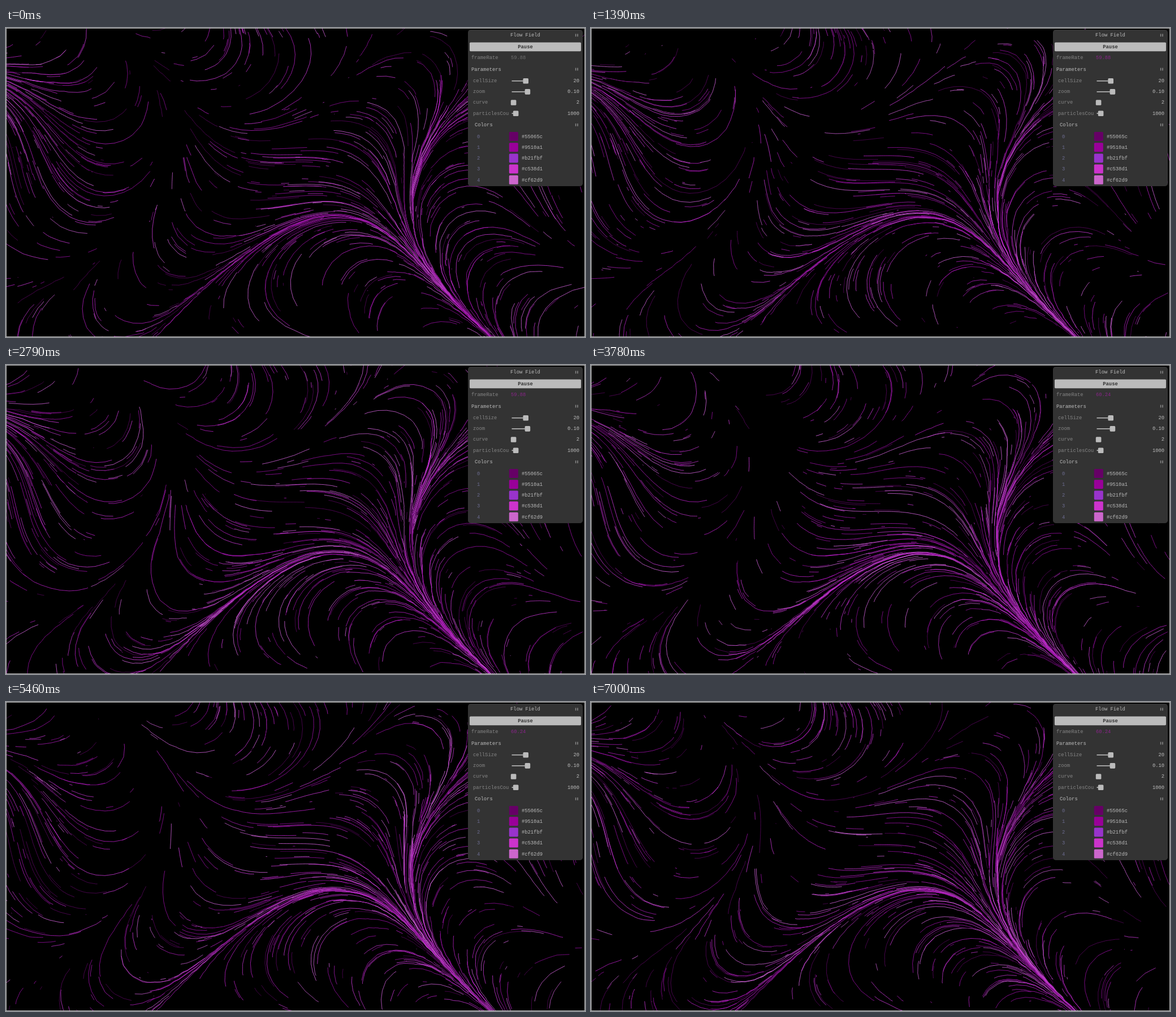
These frames come from a looping animation (1024x547 px, 7070 ms). An HTML page with a canvas:

```html
<!DOCTYPE html>
<html lang="en">
<head>
<meta charset="utf-8">
<title>Flow Field</title>
<style>
  html, body { margin: 0; width: 100%; height: 100%; overflow: hidden; background: #000; }
  canvas, svg { position: absolute; left: 0; top: 0; width: 1024px; height: 547px; }
  text { font: 8.8px "Liberation Mono", "Courier New", monospace; fill: #bbb; white-space: pre; }
  .dim { fill: #858585; }
  .index { fill: #6c6c90; }
</style>
</head>
<body>
<canvas id="field" width="1024" height="547"></canvas>
<svg id="panel" viewBox="0 0 1024 547"></svg>
<script>
const W = 1024, H = 547;
const LOOP = 7070, HOLD = 140, TICKS_PER_STEP = 8.4;
const CELL = 16, ZOOM = 0.1, CURVE = 2.25;
const COUNT = 1000;
const COLORS = ['#55065c', '#9510a1', '#b21fbf', '#c538d1', '#cf62d9'];
const SWATCHES = ['#660066', '#990099', '#9933cc', '#cc33cc', '#cc66cc'];
const RATES = ['60.24', '60.61', '59.88'];

const ctx = document.getElementById('field').getContext('2d');
const panel = document.getElementById('panel');

function random(seed) {
  let h = Math.imul(seed ^ 0x9e3779b9, 0x85ebca6b);
  h = Math.imul(h ^ (h >>> 13), 0xc2b2ae35);
  h = Math.imul(h ^ (h >>> 16), 0x27d4eb2f);
  return ((h ^ (h >>> 15)) >>> 0) / 4294967296;
}

// Direction vectors sampled at cell centres, with a margin so paths may leave the stage.
const MARGIN = 50, COLS = 64 + 2 * MARGIN, ROWS = 35 + 2 * MARGIN;
const dirX = new Float32Array(COLS * ROWS), dirY = new Float32Array(COLS * ROWS);
for (let r = 0; r < ROWS; r++) {
  for (let c = 0; c < COLS; c++) {
    const u = (c - MARGIN + 0.5) * ZOOM, v = (r - MARGIN + 0.5) * ZOOM;
    const angle = CURVE * (Math.cos(u) + Math.sin(v));
    dirX[r * COLS + c] = Math.cos(angle);
    dirY[r * COLS + c] = Math.sin(angle);
  }
}

const particles = Array.from({ length: COUNT }, (_, i) => {
  const pick = k => random(i * 16 + k);
  const length = 10 + Math.floor(pick(1) * 100);
  return {
    length,
    speed: 0.8 * (1 + Math.floor(pick(2) * 4)),
    color: Math.floor(pick(3) * COLORS.length),
    offset: Math.floor(pick(4) * length * 3)
  };
});

// Each life grows for one length, travels for one and shrinks for one.
function tracePath(p, i, tick) {
  const span = p.length * 3;
  const clock = tick + p.offset;
  const age = clock % span;
  const seed = 100000 + i * 512 + Math.floor(clock / span) * 2;
  const head = Math.min(age, p.length * 2);
  const tail = Math.max(0, age - p.length);
  let x = random(seed) * W, y = random(seed + 1) * H;
  for (let s = 0; s <= head; s++) {
    if (s === tail) ctx.moveTo(x, y);
    else if (s > tail) ctx.lineTo(x, y);
    const cell = (Math.floor(y / CELL) + MARGIN) * COLS + Math.floor(x / CELL) + MARGIN;
    x += dirX[cell] * p.speed;
    y += dirY[cell] * p.speed;
  }
}

function drawField(tick) {
  ctx.fillStyle = '#000';
  ctx.fillRect(0, 0, W, H);
  ctx.lineWidth = 0.85;
  particles.forEach((p, i) => {
    ctx.strokeStyle = COLORS[p.color];
    ctx.beginPath();
    tracePath(p, i, tick);
    ctx.stroke();
  });
}

function add(name, attrs, content) {
  const el = document.createElementNS('http://www.w3.org/2000/svg', name);
  for (const key in attrs) el.setAttribute(key, attrs[key]);
  if (content !== undefined) el.textContent = content;
  panel.appendChild(el);
  return el;
}
const box = (x, y, width, height, fill, rx = 0) => add('rect', { x, y, width, height, fill, rx });
const label = (x, y, content, attrs = {}) => add('text', { x, y, ...attrs }, content);

function foldIcon(y) {
  box(1006.8, y - 2.4, 1.6, 4.8, '#858585');
  box(1010.2, y - 2.4, 1.6, 4.8, '#858585');
}

function sliderRow(y, name, value, knobX) {
  label(826, y + 2.7, name, { class: 'dim' });
  if (knobX > 899) box(894.5, y - 0.4, knobX - 894.5, 1.6, '#bbb');
  box(knobX - 4.8, y - 4.4, 9.6, 9.6, '#bbb', 1.6);
  label(1014, y + 2.7, value, { 'text-anchor': 'end' });
}

function buildPanel() {
  add('rect', { x: 0.5, y: 0.5, width: W - 1, height: H - 1, fill: 'none', stroke: '#b4b4b4' });
  box(817, 3, 203, 277, '#333', 4.8);
  label(918.5, 15, 'Flow Field', { 'text-anchor': 'middle' });
  foldIcon(12.8);
  box(820, 25.6, 197, 15.6, '#bbb', 1.6);
  label(918.5, 36, 'Pause', { 'text-anchor': 'middle', style: 'fill:#333;font-weight:bold' });
  label(823, 55, 'frameRate', { class: 'dim' });
  const rate = label(893, 55, '');

  label(823, 75.5, 'Parameters');
  foldIcon(73);
  sliderRow(93.3, 'cellSize', '20', 919.2);
  sliderRow(112.5, 'zoom', '0.10', 922.4);
  sliderRow(131.6, 'curve', '2', 897.6);
  sliderRow(150.8, 'particlesCou', '1000', 901.6);

  label(829, 174, 'Colors');
  foldIcon(171.5);
  COLORS.forEach((color, i) => {
    const y = 192 + i * 19.2;
    label(833, y + 2.7, i, { class: 'index' });
    box(889.8, y - 8, 16, 16, SWATCHES[i], 1.6);
    label(912, y + 2.7, color);
  });
  return rate;
}

const rateText = buildPanel();
let shown = -1;

function render(time) {
  const t = time % LOOP;
  const step = Math.floor((t < 2860 ? t + 10 : t) / HOLD);
  if (step === shown) return;
  shown = step;
  drawField(Math.round(step * TICKS_PER_STEP));
  rateText.textContent = step ? RATES[Math.floor(step / 4) % 3] : '59.88';
  rateText.style.fill = step ? '#8a248a' : '#707070';
}

let start;
function loop(now) {
  start ??= now;
  render(now - start);
  requestAnimationFrame(loop);
}
render(0);
requestAnimationFrame(loop);
</script>
</body>
</html>
```
